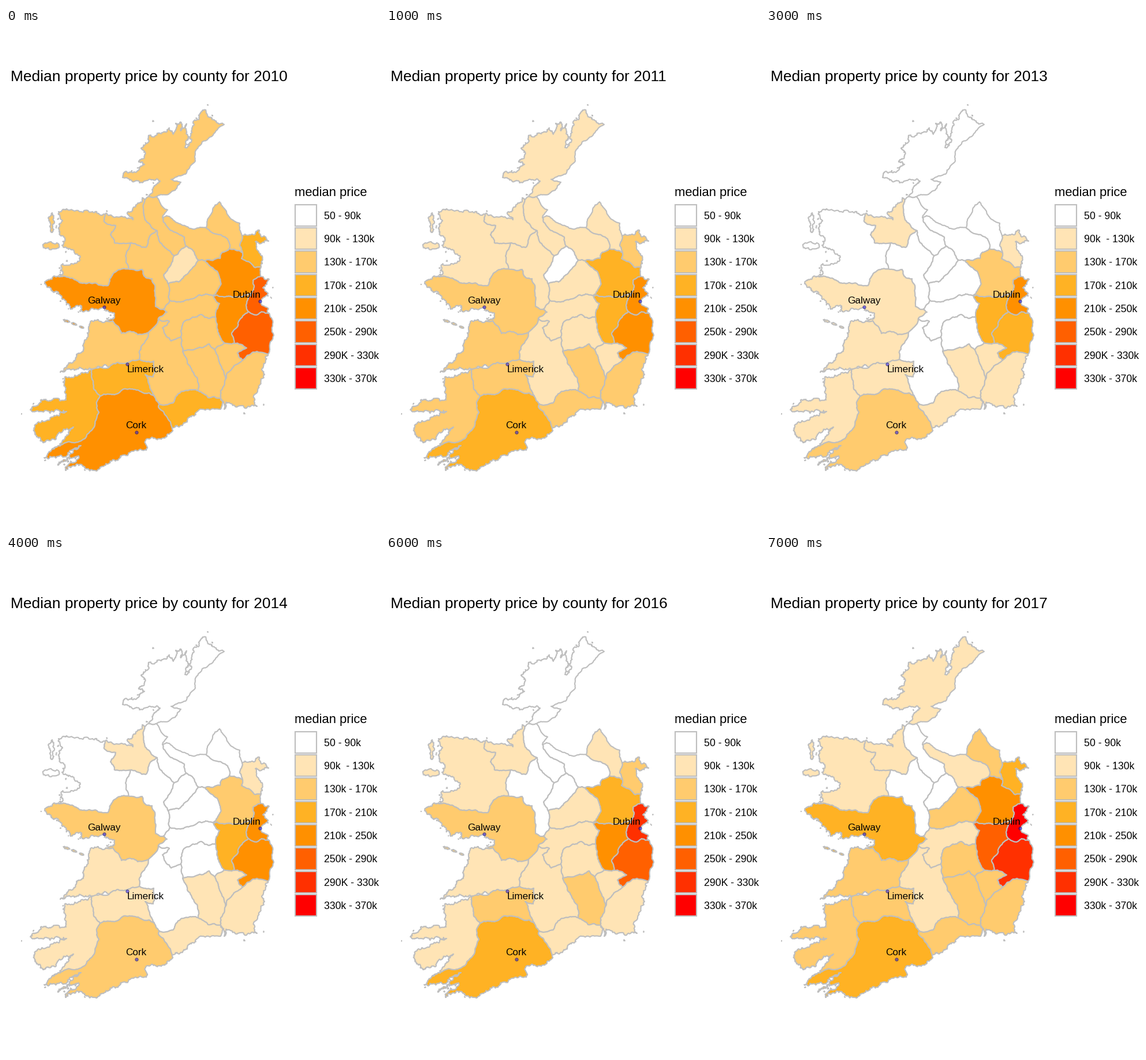
Animation of 648x864 px, one loop 8 s. Source, as a matplotlib script:

```python
import numpy as np
import matplotlib.pyplot as plt
from matplotlib.animation import FuncAnimation
from matplotlib.patches import Polygon, Rectangle

plt.rcParams["font.family"] = "Liberation Sans"

W, H, DPI = 648, 864, 144
GREY = "#bebebe"
SHADES = ["#ffffff", "#ffe4b5", "#ffcb6e", "#ffb224",
          "#ff9000", "#ff6000", "#ff3000", "#ff0000"]
LINE = 1.07
START, END = 2010, 2017

fig = plt.figure(figsize=(W / DPI, H / DPI), dpi=DPI, facecolor="white")
ax = fig.add_axes([0, 0, 1, 1])
ax.set_xlim(0, W)
ax.set_ylim(H, 0)
ax.axis("off")

rng = np.random.default_rng(4)

# junctions where borders meet each other or the sea
JOINTS = dict(
    a=(247, 292), b=(260, 292), c=(241, 297), d=(262, 351), e=(271, 328),
    f=(313, 378), g=(291, 395), h=(173, 321), i=(217, 372), j=(212, 417),
    k=(92, 431), l=(272, 487), m=(264, 503), n=(247, 527), o=(172, 508),
    p=(281, 443), q=(284, 472), r=(334, 402), s=(345, 403), t=(387, 382),
    u=(347, 346), v=(409, 360), w=(410, 389), x=(442, 413), y=(441, 430),
    z=(426, 459), A=(359, 463), B=(420, 491), C=(456, 494), D=(395, 546),
    E=(378, 545), F=(363, 500), G=(303, 535), H=(306, 560), I=(362, 557),
    J=(380, 609), K=(410, 575), L=(454, 565), M=(372, 641), N=(333, 628),
    O=(266, 651), P=(257, 637), Q=(231, 574), R=(288, 693), S=(163, 637),
    T=(148, 592), U=(95, 722), V=(178, 588), W=(378, 167), X=(151, 766))
links = {}
counties = []


def roughen(pts, amp):
    """Midpoint displacement until every step is short; ends stay fixed."""
    pts = np.asarray(pts, float)
    while True:
        step = np.diff(pts, axis=0)
        size = np.hypot(*step.T)
        if size.max() < 3.5:
            return pts
        push = np.clip(rng.uniform(-amp, amp, len(size)) * size, -2.5, 2.5)
        normal = np.column_stack([-step[:, 1], step[:, 0]])
        normal /= np.maximum(size, 0.1)[:, None]
        mid = (pts[:-1] + pts[1:]) / 2 + normal * push[:, None]
        out = np.empty((len(pts) + len(mid), 2))
        out[0::2], out[1::2] = pts, mid
        pts = out


def land(ends, *xy, amp=0.13):
    """Border between two junctions through a few key points."""
    inner = [xy[k:k + 2] for k in range(0, len(xy), 2)]
    links[ends] = roughen([JOINTS[ends[0]], *inner, JOINTS[ends[1]]], amp)


def speck(x, y):
    ax.add_patch(Polygon((x, y) + rng.uniform(-1.5, 1.5, (4, 2)), fc=GREY,
                         ec=GREY, lw=0.8, zorder=1.5))


def sea(ends, *xy, islets=0):
    """Rougher border, with islets scattered along it."""
    land(ends, *xy, amp=0.32)
    for x, y in rng.choice(links[ends], islets):
        speck(x + rng.normal(0, 3.5), y + rng.normal(0, 3.5))


def side(a, b):
    if b + a in links:
        return links[b + a][::-1]
    if a + b not in links:
        land(a + b)
    return links[a + b]


def shape(pts):
    return ax.add_patch(Polygon(pts, closed=True, fc="white", ec=GREY, lw=LINE,
                                joinstyle="round", zorder=2))


def band(first, low, last, turn, year):
    """Price eases down to its low in the turn year, then up; 40k a band."""
    if year < turn:
        price = low + (first - low) * ((turn - year) / (turn - START)) ** 2
    else:
        price = low + (last - low) * ((year - turn) / (END - turn)) ** 1.5
    return int((price - 50) // 40)


def county(ring, first, low, last, turn=2013):
    pts = np.vstack([side(a, b) for a, b in zip(ring, ring[1:] + ring[0])])
    counties.append((shape(pts), (first, low, last, turn)))
    return counties[-1][1]


def island(prices, x, y, rx, ry, tilt=0):
    a = np.linspace(0, 2 * np.pi, 9)
    c, s = np.cos(tilt), np.sin(tilt)
    pts = np.column_stack([rx * np.cos(a), ry * np.sin(a)])
    pts = pts @ [[c, s], [-s, c]] + (x, y)
    counties.append((shape(roughen(pts, 0.35)), prices))


# coasts
sea("aW", 256, 275, 267, 265, 240, 265, 222, 266, 202, 259, 206, 249, 230, 246,
    240, 236, 230, 232, 240, 220, 234, 208, 246, 198, 247, 186, 272, 181,
    283, 173, 290, 184, 294, 165, 303, 163, 303, 178, 313, 166, 317, 188,
    310, 207, 322, 194, 323, 172, 336, 148, 341, 142, 356, 157, islets=22)
sea("hc", 187, 328, 220, 332, 212, 318, 225, 309, 236, 294)
sea("kh", 98, 427, 96, 410, 128, 402, 118, 388, 100, 380, 100, 362, 91, 346,
    98, 334, 91, 323, 105, 313, 150, 318, islets=45)
sea("ko", 82, 430, 67, 440, 80, 455, 98, 470, 112, 487, 130, 481, 132, 491,
    170, 485, 188, 494, 184, 504, islets=40)
sea("Vo", 138, 590, 94, 596, 122, 570, 134, 560, 137, 540, 148, 507)
sea("UT", 80, 729, 108, 704, 117, 691, 78, 714, 64, 718, 50, 703, 50, 690,
    105, 664, 66, 664, 42, 661, 60, 644, 104, 644, 102, 604, islets=12)
sea("UX", 66, 744, 106, 740, 130, 723, 90, 757, 126, 741, 103, 765, 130, 756,
    islets=20)
sea("XR", 166, 759, 197, 745, 212, 738, 243, 731, 246, 711, 272, 710)
sea("MR", 372, 660, 330, 665, 317, 674, 306, 688)
sea("LM", 446, 587, 448, 600, 430, 635, 435, 655, 405, 654, 381, 648, 378, 660)
land("CL", 462, 506, 464, 532, 457, 556)
sea("yC", 456, 435, 445, 450, 454, 464, 441, 473, 454, 485)
sea("vx", 430, 358, 439, 350, 455, 369, 432, 370, 441, 393)

# inland borders
land("Wb", 340, 197, 329, 212, 328, 230, 311, 253, 286, 262, 303, 267, 293, 281)
land("be", 280, 315)
land("ef", 273, 336, 288, 351, 309, 362)
land("fg", 303, 384)
land("gd", 271, 376, 264, 364)
land("dc", 240, 328)
land("di", 248, 363, 242, 380)
land("ih", 188, 372, 181, 358, 190, 342, 170, 335)
land("ij", 210, 386, 208, 404)
land("jk", 187, 424, 177, 446, 133, 442, 122, 437)
land("on", 185, 507, 200, 529, 214, 525, 228, 531)
land("nm", 262, 512)
land("ml", 279, 492)
land("lj", 259, 482, 253, 434, 242, 432, 236, 418)
land("gp", 273, 428)
land("nQ", 235, 550)
land("QV", 209, 580, 194, 579)
land("QP", 256, 577, 255, 604, 241, 600, 250, 625)
land("PS", 236, 631, 204, 625, 190, 634)
land("ST", 152, 625)
land("SU", 157, 650, 161, 665, 154, 688, 137, 711)
land("RO", 278, 672, 264, 656)
land("ON", 290, 649, 303, 630)
land("NM", 350, 640)
land("NH", 331, 605, 313, 572)
land("Gm", 286, 542, 277, 533, 271, 519, 283, 508)
land("GF", 303, 524, 309, 508, 338, 496, 352, 503)
land("FE", 367, 526)
land("IH", 352, 547, 330, 555)
land("IJ", 374, 588)
land("JM", 372, 628)
land("JK", 388, 594)
land("KD", 401, 563, 417, 554)
land("KL", 428, 561)
land("BD", 403, 508, 391, 528)
land("CB", 443, 491, 436, 496)
land("zB", 420, 467, 416, 480)
land("yz", 428, 437, 430, 448)
land("Az", 386, 464, 412, 463)
land("AF", 370, 477)
land("qA", 298, 474, 333, 463)
land("sA", 366, 421, 372, 445)
land("rp", 319, 420, 299, 440)
land("fr", 326, 388)
land("st", 371, 399, 374, 389)
land("tu", 384, 365, 366, 357)
land("eu", 278, 325, 296, 337, 318, 347)
land("uv", 358, 315, 370, 301, 383, 322, 405, 338)
land("vw", 405, 377)
land("wt", 395, 383)
land("wx", 408, 399, 430, 414)

# ring of junctions, then price (k) in the first year, at its low, in the last
county("aWb", 155, 83, 92)
mayo = county("khij", 155, 83, 95)
galway = county("konmlj", 215, 125, 175)
county("UTS", 175, 105, 135)
county("UXROPS", 230, 145, 200)
county("hcdi", 140, 95, 110)
county("cabefgd", 135, 70, 85)
county("dgpqlji", 135, 70, 85)
county("eutsrf", 135, 75, 95)
county("uvwt", 135, 80, 135)
county("frpg", 100, 65, 75)
county("rsAqp", 155, 83, 133)
county("qAFGml", 155, 83, 115)
county("FEIHG", 135, 80, 135)
county("mGHNOPQn", 155, 83, 115)
county("VonQ", 165, 108, 135)
county("TVQPS", 200, 122, 140)
county("ONMR", 175, 105, 135)
county("HIJMN", 165, 112, 168)
county("IEDKJ", 140, 100, 135)
county("KLMJ", 165, 108, 135)
county("BCLKD", 280, 200, 325)
county("AzBDEF", 245, 180, 285)
county("stwxyzA", 235, 155, 235)
county("vxw", 180, 100, 175)
county("yCBz", 285, 205, 365, turn=2012)

island(mayo, 78, 377, 14, 7)
island(mayo, 80, 337, 4, 17)
for k in range(3):
    island(galway, 105 + 13 * k, 507 + 5.5 * k, 6 - k, 1.5, 0.35)
for spot in [(349, 133), (255, 161), (463, 450), (459, 467), (446, 652),
             (413, 667), (28, 668)]:
    speck(*spot)


def label(x, y, text, pt, ha="left"):
    return ax.text(x, y, text, size=pt, ha=ha, va="baseline", color="black",
                   zorder=5)


for name, dot_x, dot_y, x, y in [("Galway", 170, 483, 170, 477),
                                 ("Dublin", 440, 472.5, 416.5, 467),
                                 ("Limerick", 209.5, 582, 241.5, 596),
                                 ("Cork", 225.5, 699.5, 225.5, 693)]:
    ax.plot(dot_x, dot_y, "o", ms=2.7, mfc=(0, 0, 1, 0.5),
            mec=(0.1, 0.1, 0.3, 0.6), mew=0.45, zorder=4)
    label(x, y, name, 8.54, "center")

label(499.5, 291, "median price", 11)
for i, shade in enumerate(SHADES):
    y = 324.4 + 40.32 * i
    ax.add_patch(Rectangle((501, y - 18.6), 37.2, 37.2, fc=shade, ec=GREY,
                           lw=LINE, joinstyle="miter"))
    low = 50 + 40 * i
    gap = "  - " if i == 1 else " - "
    unit = ["", "k", "k", "k", "k", "k", "K", "k"][i]
    label(551.3, y + 6.4, f"{low}{unit}{gap}{low + 40}k", 8.8)

title = label(8, 92, "", 13.2)


def draw(frame):
    year = START + frame
    title.set_text(f"Median property price by county for {year}")
    for patch, prices in counties:
        patch.set_facecolor(SHADES[band(*prices, year)])
    return []


anim = FuncAnimation(fig, draw, frames=END - START + 1, interval=1000,
                     repeat=True, repeat_delay=0)
plt.show()
```
